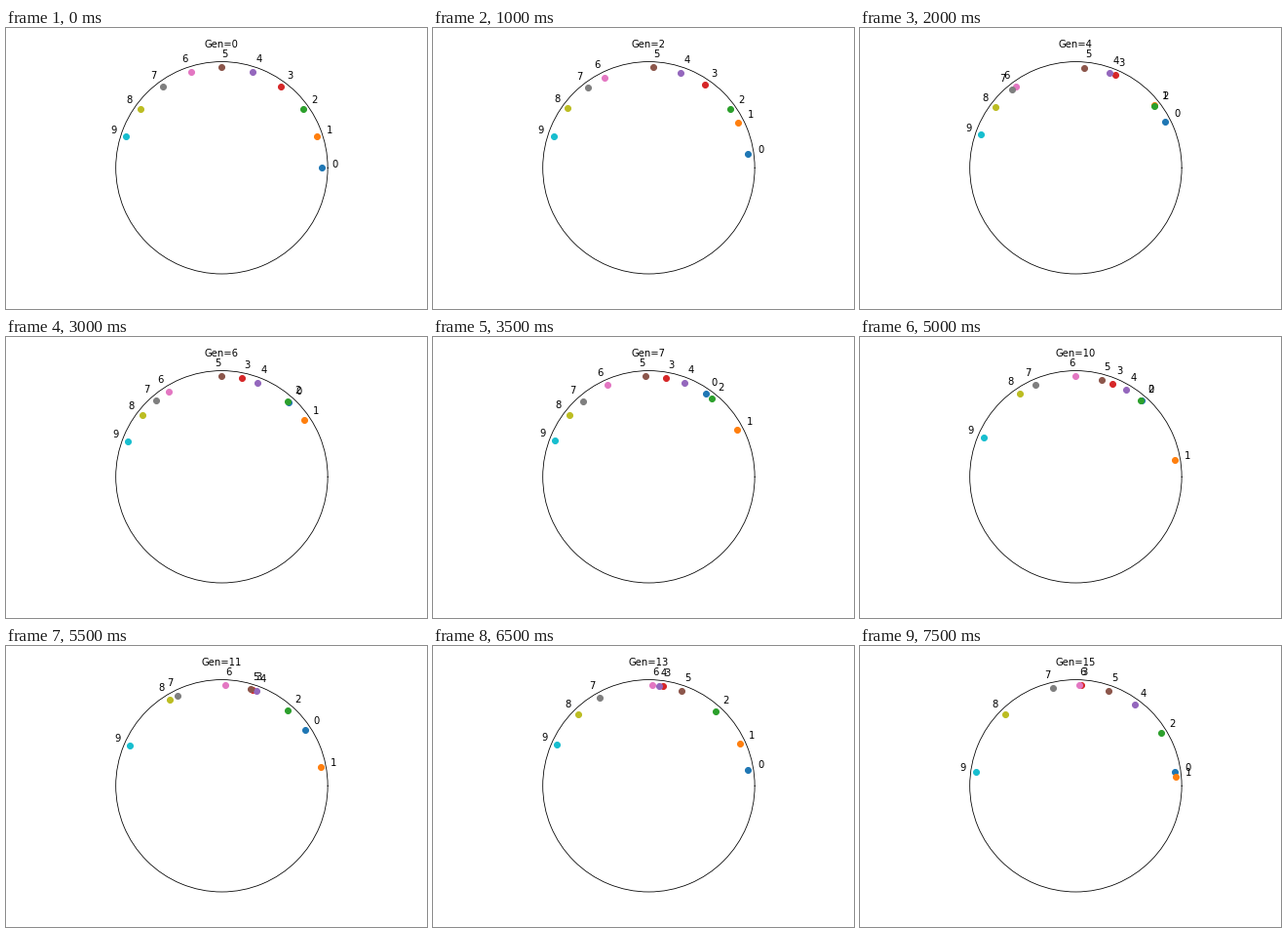
Animation of 432x288 px, one loop 8000 ms. Source, as a matplotlib script:

```python
import numpy as np
import matplotlib.pyplot as plt
from matplotlib.animation import FuncAnimation

GENS = 16
RIM, LABEL_R, TITLE_R = 1.055, 1.1, 1.2

# Turning points (generation, degrees) of each walker
TURNS = [
    [(8.5, 60), (13.5, 8)],
    [(4.5, 39), (10.5, 9), (13, 25), (15, 5)],
    [(3, 36), (7, 51), (13, 48), (15, 32)],
    [(1, 54), (7, 80), (9, 67), (15, 87)],
    [(7, 69), (9, 56), (13, 84), (15, 54)],
    [(4, 85), (7, 92), (9, 76), (13, 71)],
    [(4.5, 127), (11, 88)],
    [(7, 131), (9, 113), (13, 119), (15, 103)],
    [(7, 142), (11, 121), (12, 135)],
    [(13, 156), (14, 172)],
]


def angle_at(walker, gen):
    """Start evenly spaced, then swing between turning points with cosine easing."""
    when, deg = zip((0, 18 * walker), *TURNS[walker])
    leg = np.interp(gen, when, range(len(when)))
    k, t = divmod(leg, 1)
    eased = k + (1 - np.cos(np.pi * t)) / 2
    return np.radians(np.interp(eased, range(len(deg)), deg))


plt.rcParams.update({"font.family": "DejaVu Sans", "font.size": 10})
fig = plt.figure(figsize=(6, 4), dpi=72, facecolor="white")
fig.subplots_adjust(left=0.125, right=0.9, bottom=0.125, top=0.88)
ax = fig.add_subplot(projection="polar")
ax.set_xticks([])
ax.set_yticks([])
ax.grid(False)

dots = [ax.scatter([0], [1], s=36, color=f"C{i}", clip_on=False, zorder=3 + i / 100)
        for i in range(len(TURNS))]
labels = [ax.text(0, LABEL_R, str(i)) for i in range(len(TURNS))]
title = ax.text(np.pi / 2, TITLE_R, "", ha="center")
ax.set_ylim(0, RIM)


def update(gen):
    for i, (dot, label) in enumerate(zip(dots, labels)):
        angle = angle_at(i, gen)
        dot.set_offsets([[angle, 1]])
        label.set_x(angle)
        label.set_ha("left" if np.cos(angle) >= 0 else "right")
    title.set_text(f"Gen={gen}")
    return [*dots, *labels, title]


anim = FuncAnimation(fig, update, frames=GENS, interval=500, repeat=True,
                     repeat_delay=0, blit=False)
plt.show()
```
